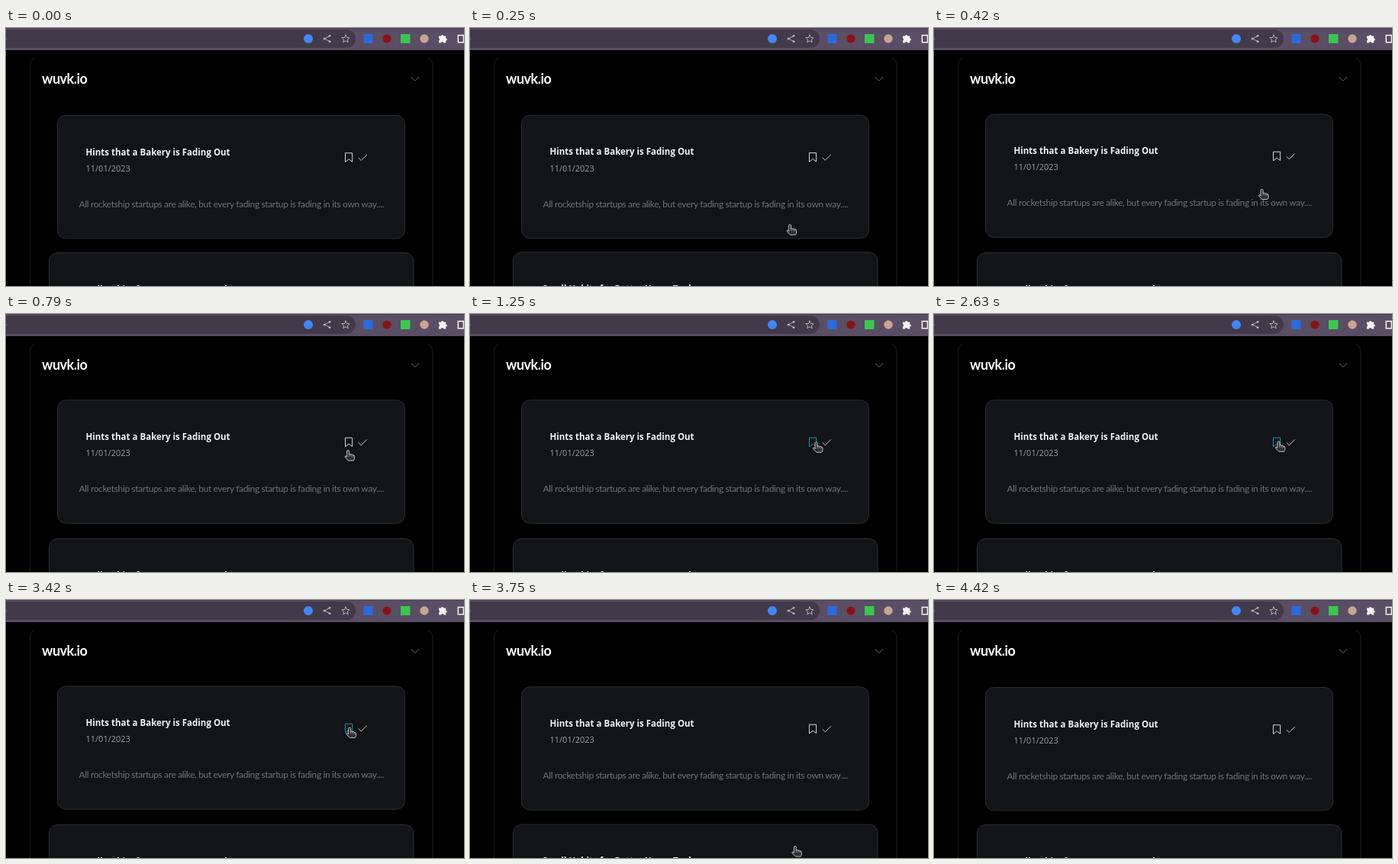
An HTML page for the animation above (4.54 s loop, 600 by 338 pixels).

```html
<!DOCTYPE html>
<html lang="en">
<head>
<meta charset="utf-8">
<title>Reading list</title>
<style>
  html, body { margin: 0; width: 100%; height: 100%; overflow: hidden; background: #000; }
  svg { display: block; width: 600px; height: 338px; }
  .title { font: 700 11.5px "Open Sans", sans-serif; fill: #f1f1f2; }
  .date { font: 400 11px "Open Sans", sans-serif; fill: #9c9da1; }
  .copy { font: 400 12px Lato, sans-serif; letter-spacing: -.36px; fill: #707175; }
  .site { font: 700 18px Lato, sans-serif; letter-spacing: -.5px; fill: #fff; }
  .panel { fill: #131417; stroke: #2b2c30; }
  .line { fill: none; stroke-linecap: round; stroke-linejoin: round; }
</style>
</head>
<body>
<svg viewBox="0 0 600 338">
  <rect width="600" height="338"/>

  <!-- browser toolbar -->
  <rect width="600" height="29" fill="#594e63"/>
  <rect width="600" height="1" fill="#4a4053"/>
  <rect x="-20" y="2" width="478" height="24" rx="12" fill="#423949"/>
  <path d="M0 13v2" stroke="#a9a2b0"/>
  <circle cx="396" cy="14" r="6" fill="#4285f4"/>
  <g class="line" stroke="#c0bac5" stroke-width=".9">
    <path d="M424 10.500l-7 3.500 7 3.500"/>
    <g fill="#c0bac5">
      <circle cx="424" cy="10.300" r="1"/><circle cx="417" cy="14" r="1"/><circle cx="424" cy="17.700" r="1"/>
    </g>
    <path d="M445 9l1.500 3.400 3.600.3-2.700 2.400.8 3.600-3.200-1.900-3.200 1.900.8-3.600-2.700-2.400 3.600-.3z"/>
  </g>
  <rect x="468.500" y="8" width="12" height="12" fill="#2a6ae0"/>
  <circle cx="499" cy="14" r="5.500" fill="#8b1118"/>
  <rect x="517" y="8" width="12.500" height="12" fill="#39c653"/>
  <circle cx="548" cy="14" r="5.700" fill="#c9a394"/>
  <path fill="#f4f2f5" d="M567 10.500h3a1.600 1.600 0 0 1 3.200 0h3v3a1.600 1.600 0 0 1 0 3.200v2.800h-3a1.600 1.600 0 0 0-3.200 0h-3v-3a1.600 1.600 0 0 0 0-3z"/>
  <path fill="none" stroke="#f4f2f5" stroke-width="1.500" d="M602 9.500h-9.700v9.200h9.700M599.500 9.500v9"/>

  <!-- feed section -->
  <path class="line" stroke="#1d1d20" d="M31.500 340V50Q31.500 42 37 40M559 340V50Q559 42 553 40"/>
  <text class="site" x="47" y="73">wuvk.io</text>
  <path class="line" stroke="#77787c" stroke-width=".9" d="M531 64.700l4.800 4.700 4.800-4.700"/>

  <g id="lower">
    <rect class="panel" x="56.500" y="294.500" width="477.500" height="80" rx="11"/>
    <text class="title" x="95" y="346.500">Small Habits for Better Home Tools</text>
  </g>
  <g id="card">
    <rect class="panel" x="67.500" y="114.500" width="455" height="161.300" rx="11"/>
    <text class="title" x="104.500" y="166.500">Hints that a Bakery is Fading Out</text>
    <text class="date" x="104.500" y="188">11/01/2023</text>
    <text class="copy" x="95.500" y="235">All rocketship startups are alike, but every fading startup is fading in its own way....</text>
    <path id="bookmark" class="line" d="M444.800 163.800h8.800v11.500l-4.400-3.500-4.400 3.500z"/>
    <path class="line" stroke="#d6d6d8" stroke-width=".9" d="M462 170.300l3.300 3.200 7.200-7.200"/>
  </g>
  <text id="toast" class="copy" x="519" y="131.500" text-anchor="end" style="fill:#dededf">Already bookmarked</text>

  <g id="hand" stroke="#d2d2d2" stroke-width=".9" stroke-linejoin="round">
    <path fill="#303134" d="M-1.500 1.200Q-1.400-.2 0-.2T1.500 1.200V5.200Q3 4.200 4 5.400Q6 4.400 6.300 6.200Q8.500 5.600 8.500 8V10.500Q8.500 12 7.200 13.200H.4Q-1 11.500-3 9.800Q-4.800 7.900-3.500 7.200Q-2.700 6.800-1.500 8.500Z"/>
    <path d="M1.500 5v3M4 5.500v2.500M6.300 6.200v2.300" stroke-width=".6"/>
  </g>
</svg>
<script>
const LOOP = 4540, LIFT = 1.6;
const $ = id => document.getElementById(id);

// Pointer stops: time, x, y of the fingertip
const path = [
  [0, 396, 350], [60, 397, 345], [200, 414, 280], [310, 425, 232], [420, 429.500, 211.500],
  [540, 437, 198], [880, 452, 172], [1080, 453.500, 168], [1380, 453.500, 168],
  [1560, 452, 167], [2540, 452, 167], [2830, 450, 167], [3420, 450, 167],
  [3500, 448, 185], [3620, 439, 250], [3800, 421, 350], [LOOP, 421, 350]
];

const clamp = v => Math.min(1, Math.max(0, v));
const ease = v => v * v * (3 - 2 * v);
const hover = (t, start, end) => ease(clamp((t - start) / 150)) - ease(clamp((t - end) / 150));
const shift = (el, x, y) => el.setAttribute("transform", `translate(${x} ${y})`);

function pointer(t) {
  const i = path.findIndex(stop => stop[0] > t);
  const [t0, x0, y0] = path[i - 1], [t1, x1, y1] = path[i];
  const k = (t - t0) / (t1 - t0);
  return [x0 + (x1 - x0) * k, y0 + (y1 - y0) * k];
}

function draw(now) {
  const t = now % LOOP;
  shift($("card"), 0, -LIFT * hover(t, 215, 3665));
  shift($("lower"), 0, -LIFT * (hover(t, 90, 170) + hover(t, 3700, 3780)));
  shift($("hand"), ...pointer(t));
  $("bookmark").setAttribute("stroke", t > 890 && t < 3470 ? "#0f9bb0" : "#d6d6d8");
  $("toast").style.opacity = t >= 1420 && t < 2420 ? 1 : 0;
  requestAnimationFrame(draw);
}
requestAnimationFrame(draw);
</script>
</body>
</html>
```
